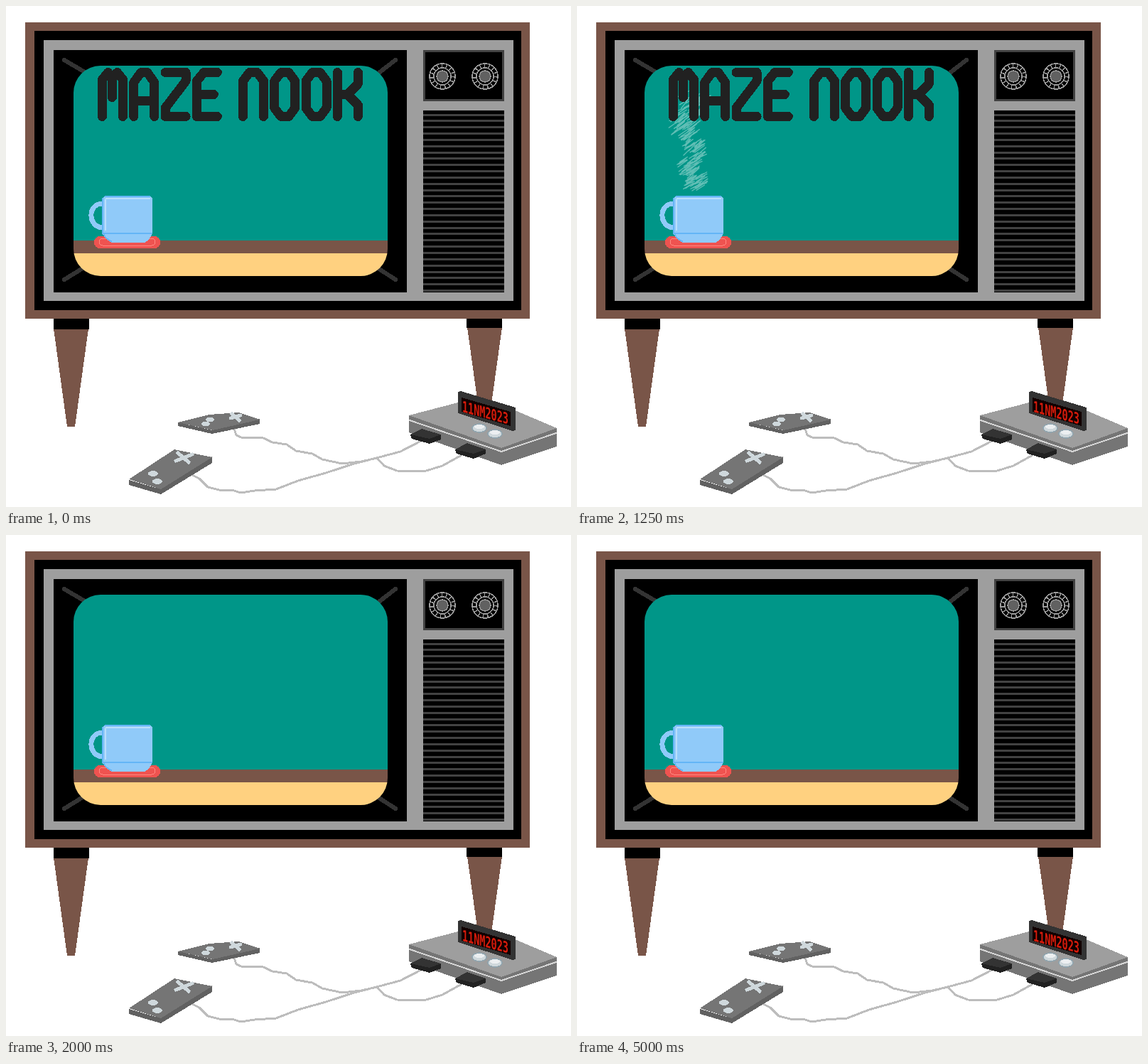
These frames come from a looping animation (795 px wide and 705 px high, 6000 ms). An HTML page:

```html
<!DOCTYPE html>
<html lang="en">
<head>
<meta charset="utf-8">
<title>Retro television</title>
<style>
  html, body { margin: 0; width: 100%; height: 100%; overflow: hidden; background: #fff; }
  svg { display: block; }
  .line { fill: none; stroke-linecap: round; stroke-linejoin: round; }
</style>
</head>
<body>
<svg width="795" height="705" viewBox="0 0 795 705" shape-rendering="crispEdges">
  <clipPath id="tube"><rect x="95" y="84" width="442" height="296" rx="38"/></clipPath>

  <!-- cabinet -->
  <path fill="#795548" d="M27 23H737V440H27ZM67 454H116L97 592H86ZM649 452H698L683 560H664Z"/>
  <path d="M40 35H725V428H40ZM67 440H117V455H67ZM648 440H698V453H648Z"/>
  <path fill="#9e9e9e" d="M53 48H714V415H53Z"/>
  <path d="M67 62H564V403H67ZM587 147H701V403H587Z"/>
  <path class="line" stroke="#333" stroke-width="6" d="M82 76L109 92M548 76L526 93M82 385L108 369M548 385L525 370"/>
  <rect x="588.5" y="63.5" width="111" height="69" stroke="#424242" stroke-width="3"/>
  <g id="dials" fill="none" stroke="#9e9e9e" stroke-width="1.5"></g>
  <g id="grille" fill="#424242"></g>

  <!-- screen -->
  <g clip-path="url(#tube)">
    <path fill="#009688" d="M95 84H537V330H95Z"/>
    <path fill="#795548" d="M95 330H537V348H95Z"/>
    <path fill="#ffd180" d="M95 348H537V380H95Z"/>
  </g>
  <rect x="124" y="324" width="93" height="17" rx="8" fill="#ef5350"/>
  <rect x="131" y="327" width="79" height="10" rx="5" fill="none" stroke="#ff8a80"/>
  <path class="line" stroke="#90caf9" stroke-width="7" d="M136 278C114 278 115 311 136 312"/>
  <path fill="#90caf9" d="M139 267H202L206 271V318Q204 328 195 333H149Q138 328 135 318V271Z"/>
  <path class="line" stroke="#64b5f6" stroke-width="1.5" d="M140 268H202M136 271V320H205M138 322Q141 328 148 331"/>
  <path class="line" stroke="#bbdefb" stroke-width="1.5" d="M141 271H202M140 273V315"/>
  <path id="steam" class="line" stroke="#fff" stroke-width="1.3" opacity=".38" shape-rendering="auto"/>
  <g id="title" class="line" stroke="#212121" stroke-width="13" role="img" aria-label="MAZE NOOK"></g>

  <!-- cables -->
  <path class="line" stroke="#bdbdbd" stroke-width="3" d="M320 592L324 604L331 607L362 608L375 614L395 617L408 626L431 630L445 638L473 644L500 641L522 636L532 647L550 654L588 655L614 647L641 632M258 658L272 665L284 677L300 681L318 681L330 685L350 682L380 680L411 668L450 657L490 644L525 635L555 627L584 612"/>

  <!-- controllers -->
  <path fill="#616161" d="M242 586L290 597L357 581V588L290 602L242 591ZM173 667L218 680L290 634V643L218 687L173 674Z"/>
  <path fill="#757575" d="M242 586L286 575L328 572L357 582L291 597ZM173 666L237 624L290 635L218 680Z"/>
  <path class="line" stroke="#cfd8dc" stroke-width="5" d="M316 580L330 576M318 574L328 583M239 640L262 631M242 629L257 642"/>
  <g fill="#cfd8dc">
    <ellipse cx="281" cy="588" rx="6" ry="3.5"/><ellipse cx="287" cy="582" rx="6" ry="3.5"/>
    <ellipse cx="207" cy="658" rx="7" ry="4"/><ellipse cx="213" cy="669" rx="7" ry="4"/>
  </g>

  <!-- console -->
  <path fill="#757575" d="M567 576L697 621L775 594V620L697 646L567 600Z"/>
  <path fill="#9e9e9e" d="M567 576L636 558L690 560L716 569L775 594L697 622Z"/>
  <path class="line" stroke="#d5d5d5" stroke-width="2" d="M568 583L697 627L774 601"/>
  <path fill="#212121" d="M569 603L585 595L612 603V610L596 616L571 609ZM632 624L649 615L675 624V630L658 637L634 630Z"/>
  <path fill="#333" d="M569 603L585 595L612 603L596 609ZM632 624L649 615L675 624L658 630Z"/>
  <g fill="#cfd8dc" stroke="#90a4ae" stroke-width="1.5">
    <ellipse cx="666" cy="594" rx="10" ry="6"/><ellipse cx="688" cy="602" rx="10" ry="6"/>
  </g>
  <g fill="#eceff1">
    <ellipse cx="666" cy="592" rx="7" ry="3"/><ellipse cx="688" cy="600" rx="7" ry="3"/>
  </g>
  <path fill="#333" d="M636 543L640 542L717 565V597L713 598L636 573Z"/>
  <path fill="#110000" d="M641 551L710 571V591L641 571Z"/>
  <text transform="matrix(1 .27 0 1.6 642 571)" font-family="'DejaVu Sans Mono', monospace" font-weight="bold" font-size="13.5" fill="#d81b0b">11NM2023</text>
</svg>
<script>
  const byId = id => document.getElementById(id);
  const add = (id, markup) => byId(id).insertAdjacentHTML('beforeend', markup);

  for (const x of [614, 674]) {
    add('dials', `<circle cx="${x}" cy="99" r="18"/><circle cx="${x}" cy="99" r="12"/>
      <circle cx="${x}" cy="99" r="15" stroke-width="5" stroke-dasharray="1.5 4.78"/>
      <circle cx="${x}" cy="99" r="8" fill="#616161"/>`);
  }
  for (let i = 0; i < 29; i++) {
    add('grille', `<rect x="587" y="${Math.round(151.5 + i * 8.84)}" width="114" height="3"/>`);
  }

  const glyphs = {
    M: 'M0 62V10L8 0L14 8V35M14 8L21 0L29 10V62',
    A: 'M0 62V14L10 0H19L29 14V62M0 40H29',
    Z: 'M0 0H29V12L0 50V62H29',
    E: 'M29 0H10L0 12V62H29M0 31H24',
    N: 'M0 62V12L9 0H20L29 12V62',
    O: 'M9 0H20L29 12V50L20 62H9L0 50V12Z',
    K: 'M0 0V62M29 0V16L14 31H0M14 31L29 46V62'
  };
  [...'MAZE NOOK'].forEach((c, i) => {
    const x = 135.5 + i * 44.3 - (i > 4 ? 23.5 : 0);
    if (glyphs[c]) add('title', `<path transform="translate(${x} 93.5)" d="${glyphs[c]}"/>`);
  });

  // Hatched puffs, each given as [x, y, half width, half height].
  function hatch(puffs) {
    let seed = 7, d = '';
    const rand = () => (seed = seed * 16807 % 2147483647) / 2147483647 * 2 - 1;
    for (const [x, y, w, h] of puffs) {
      for (let i = 0; i < 36; i++) {
        const cx = x + rand() * w * .65, cy = y + rand() * h * .7;
        const dx = w * (.3 + rand() * .1), dy = h * (.24 + rand() * .08);
        d += `M${cx - dx} ${cy + dy}L${cx + dx} ${cy - dy}`;
      }
    }
    return d;
  }
  const puffs = [[165, 203, 18, 17], [158, 226, 18, 16], [168, 247, 18, 14]];
  const low = hatch(puffs);
  const high = hatch([[164, 138, 25, 21], [149, 170, 25, 22], ...puffs]);

  const start = performance.now();
  function draw() {
    const t = (performance.now() - start) % 6000;
    const titled = t < 2000 || (t >= 3000 && t < 5000);
    const steaming = t >= 1000 && t < 1750;
    const tall = t >= 1250 && t < 1500;
    byId('title').style.display = titled ? '' : 'none';
    byId('steam').setAttribute('d', !steaming ? '' : tall ? high : low);
    requestAnimationFrame(draw);
  }
  draw();
</script>
</body>
</html>
```
